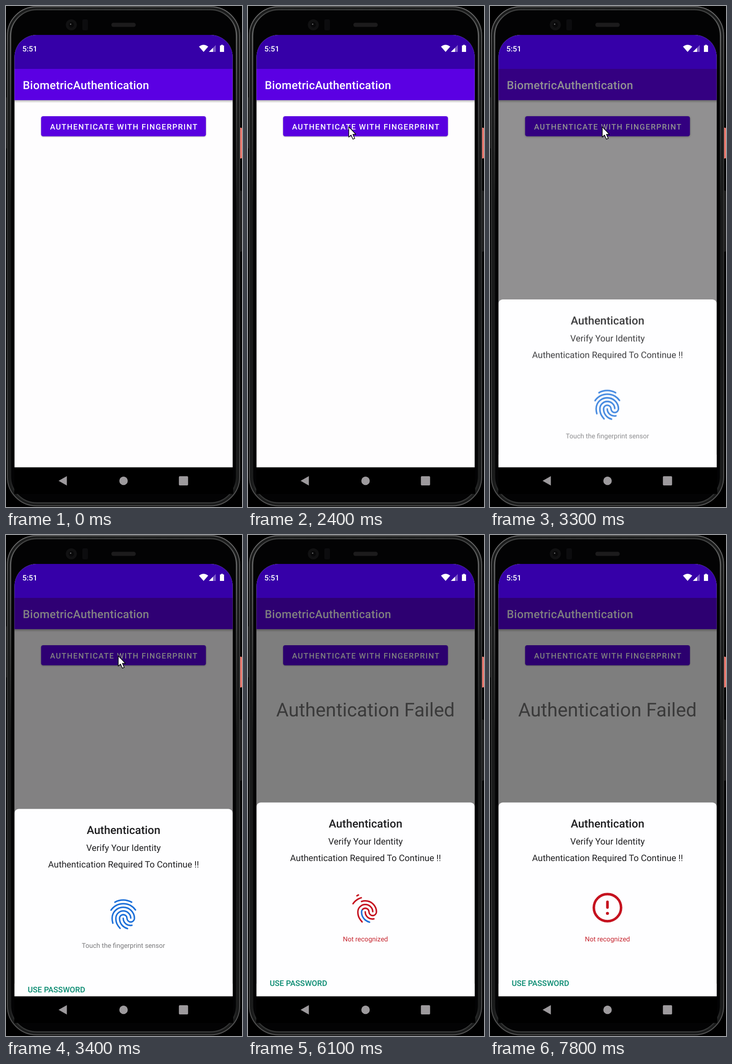
Write an HTML page that moves like this. It is 513 by 1091 pixels and loops after 8000 ms.

```html
<!DOCTYPE html>
<html lang="en">
<head>
<meta charset="utf-8">
<title>Biometric prompt</title>
<style>
  html, body { margin: 0; width: 100%; height: 100%; overflow: hidden; background: #000; }
  svg { display: block; font-family: Roboto, sans-serif; text-rendering: geometricPrecision; }
  .med { font-weight: 500; }
  .mid { text-anchor: middle; }
  .line { fill: none; stroke-linecap: round; stroke-linejoin: round; }
</style>
</head>
<body>
<svg width="513" height="1091" viewBox="0 0 513 1091">
  <defs>
    <linearGradient id="edge" x1="0" y1="0" x2="0" y2="1">
      <stop offset="0" stop-color="#6a6a6a"/>
      <stop offset=".08" stop-color="#555"/>
      <stop offset=".25" stop-color="#383939"/>
      <stop offset=".6" stop-color="#2b2c2c"/>
      <stop offset="1" stop-color="#555"/>
    </linearGradient>
    <linearGradient id="gloss" x1="0" y1="0" x2="0" y2="1">
      <stop offset="0" stop-color="#3c3d3d"/>
      <stop offset=".05" stop-color="#6c6d6d"/>
      <stop offset=".2" stop-color="#454646"/>
      <stop offset=".4" stop-color="#151616"/>
      <stop offset=".95" stop-color="#1c1d1d"/>
      <stop offset="1" stop-color="#3a3b3b"/>
    </linearGradient>
    <linearGradient id="shade" x1="0" y1="0" x2="0" y2="1">
      <stop offset="0" stop-opacity=".28"/>
      <stop offset="1" stop-opacity="0"/>
    </linearGradient>
    <clipPath id="screen">
      <path d="M18.500 1006V111A48 48 0 0 1 66.500 63H444.700A48 48 0 0 1 492.700 111V1006Z"/>
    </clipPath>
  </defs>

  <!-- phone body -->
  <rect width="513" height="1091"/>
  <rect x="505" y="265" width="8" height="67" rx="2" fill="#ec7b70"/>
  <rect x="505" y="402" width="8" height="133" rx="2" fill="#1c1c1c"/>
  <path d="M0 199H3V310H0Z" fill="#161616"/>
  <rect x="3" y="1.500" width="505" height="1087" rx="63" fill="#1a1b1b" stroke="url(#edge)" stroke-width="2"/>
  <rect x="10" y="8" width="491" height="1074" rx="57" fill="#030304" stroke="url(#gloss)" stroke-width="2.500"/>
  <circle cx="142" cy="41" r="12" fill="#111112"/>
  <circle cx="142" cy="41" r="6" fill="#09090a"/>
  <circle cx="140.500" cy="39.500" r="1.500" fill="#666"/>
  <rect x="166" y="29" width="12" height="24" rx="3" fill="#0c0c0e"/>
  <rect x="229" y="36.500" width="53" height="9" rx="4.500" fill="#1c1b1c"/>

  <g clip-path="url(#screen)">
    <rect x="18" y="63" width="476" height="943" fill="#fefdfe"/>
    <rect x="18" y="205" width="476" height="6" fill="url(#shade)"/>
    <rect x="18" y="137" width="476" height="68" fill="#5b00e3"/>
    <text class="med" x="36.500" y="181" font-size="24.600" letter-spacing=".3" fill="#fff">BiometricAuthentication</text>
    <rect id="button" x="76.300" y="240" width="358.300" height="43.800" rx="4.500" fill="#5900e0"/>
    <text class="med" x="95.700" y="269" font-size="16.900" letter-spacing="1.510" fill="#fff">AUTHENTICATE WITH FINGERPRINT</text>
    <text id="failed" class="mid" x="255.300" y="395" font-size="41.300" fill="#757575">Authentication Failed</text>
    <rect id="dim" x="18" y="137" width="476" height="840"/>

    <g id="sheet">
      <rect x="18.500" y="582.500" width="474.200" height="480" rx="9" fill="#fefeff"/>
      <g id="content" fill="#1f1f21">
        <text class="mid med" x="255.500" y="637" font-size="24.400">Authentication</text>
        <text class="mid" x="255.500" y="674" font-size="19.350">Verify Your Identity</text>
        <text class="mid" x="255.500" y="710" font-size="19.300">Authentication Required To Continue !!</text>
        <g id="finger" class="line" transform="translate(255 812) scale(3.14 3.28) translate(-12 -12)"></g>
        <g id="error" fill="#c5121f">
          <circle id="ring" class="line" cx="255.300" cy="811.500" r="29.600" pathLength="1" stroke="#c5121f" stroke-width="5.500" transform="rotate(-90 255.300 811.500)"/>
          <g id="mark">
            <rect x="-2.900" y="-15.500" width="5.800" height="18" rx="2.900"/>
            <circle cy="12.500" r="3.300"/>
          </g>
        </g>
        <text id="hint" class="mid" x="255.300" y="885" font-size="14.500"></text>
        <text class="med" x="47.200" y="982" font-size="17" fill="#078a70">USE PASSWORD</text>
      </g>
    </g>

    <!-- status bar -->
    <rect x="18" y="63" width="476" height="74" fill="#3600a8"/>
    <g fill="#fff">
      <text class="med" x="35.500" y="99" font-size="16.500">5:51</text>
      <path d="M419.500 88.500Q429.500 80.500 439.500 88.500L429.500 100Z"/>
      <path d="M441 100L456 85V100Z" opacity=".35"/>
      <path d="M441 100L450 91V100Z"/>
      <path d="M467.500 84.500H471.500V86H474V100H465V86H467.500Z"/>
    </g>
  </g>

  <!-- navigation bar -->
  <rect x="18" y="1004.600" width="476" height="58"/>
  <g fill="#9d9a9d">
    <path d="M114.300 1034L132.300 1023.700V1044.300Z"/>
    <circle cx="255.500" cy="1034" r="9.200"/>
    <rect x="375.800" y="1024" width="20" height="20" rx="2"/>
  </g>

  <path id="cursor" d="M0 0V22.500L5 18L9 27L13 25.300L9 16.500H15.500Z" fill="#fff" stroke="#000" stroke-width="1.400" stroke-linejoin="round"/>
</svg>
<script>
const LOOP = 8000, STEP = 100, FAIL = 5900;
const BLUE = '#1d70d9', RED = '#c5121f';
const $ = id => document.getElementById(id);
const show = (el, on) => el.setAttribute('visibility', on ? 'inherit' : 'hidden');

// Piecewise linear value from [time, value] pairs.
function tween(t, keys) {
  if (t <= keys[0][0]) return keys[0][1];
  for (let i = 1; i < keys.length; i++) {
    const [a, from] = keys[i - 1], [b, to] = keys[i];
    if (t <= b) return from + (to - from) * (t - a) / (b - a);
  }
  return keys[keys.length - 1][1];
}

// Each ridge: path, then the trimmed end and the red start 100, 200 and 300 ms after the failure.
const ridges = [
  ['M6.2 3.97C7.82 3 9.9 2.500 12 2.500S15.8 2.95 17.8 3.97', [.6, .1, 0], [.3, 0, 0]],
  ['M3.5 9.22C4.4 7.9 5.6 6.85 7.05 6.1C10.1 4.55 13.95 4.55 17 6.1C18.4 6.85 19.6 7.9 20.5 9.2', [.75, .36, 0], [.4, 0, 0]],
  ['M14.9 21.5C13.4 21.1 12.4 20.55 11.4 19.55C10.1 18.25 9.39 16.5 9.39 14.66C9.39 13.32 10.55 12.22 11.97 12.22S14.55 13.32 14.55 14.66S15.7 17.1 17.13 17.1S19.71 16 19.71 14.66C19.71 10.6 16.25 7.33 11.96 7.33C8.9 7.33 6.13 9.02 4.9 11.65C4.47 12.5 4.26 13.5 4.26 14.66C4.26 15.5 4.33 16.8 4.95 18.45', [.92, .76, .4], [.65, .22, 0]],
  ['M9.75 21.29C8.95 20.45 8.45 19.85 7.8 18.7C7.18 17.6 6.84 16.16 6.84 14.66C6.84 11.95 9.15 9.77 12 9.77S17.16 11.95 17.16 14.66', [1, 1, .5], [.5, 0, 0]],
  ['M11.94 14.66C11.94 16.2 12.75 17.65 14.1 18.57C14.9 19.1 15.85 19.4 16.92 19.4C17.2 19.4 17.6 19.37 18.05 19.29', [1, 1, .5], [.6, 0, 0]]
].map(([d, end, red]) => {
  const stroke = color => {
    const p = document.createElementNS('http://www.w3.org/2000/svg', 'path');
    const attrs = { d, stroke: color, pathLength: 1, 'stroke-width': 1.02 };
    for (const k in attrs) p.setAttribute(k, attrs[k]);
    return $('finger').appendChild(p);
  };
  const keys = list => [1, ...list, 0].map((v, i) => [FAIL + i * 100, v]);
  return { blue: stroke(BLUE), red: stroke(RED), end: keys(end), start: keys(red) };
});

function trim(path, from, to) {
  show(path, to > from);
  path.setAttribute('stroke-dasharray', `${to - from} 9`);
  path.setAttribute('stroke-dashoffset', -from);
}

const cursorX = [[1200, 470], [1300, 440], [1400, 440], [1700, 380], [2000, 270], [2300, 222], [2400, 219], [2700, 240], [2900, 244], [3500, 244], [3800, 360], [4100, 520]];
const cursorY = [[1200, 760], [1400, 774], [1700, 620], [2000, 370], [2300, 268], [2400, 263], [3500, 263], [4100, 250]];

function draw(t) {
  show($('cursor'), t >= 1200 && t < 4100);
  $('cursor').setAttribute('transform', `translate(${tween(t, cursorX)} ${tween(t, cursorY)})`);

  const lift = tween(t, [[2900, 0], [3100, 1], [3200, 1], [3300, .3], [3500, 0]]);
  $('button').style.filter = `drop-shadow(0 ${1 + 2 * lift}px ${1 + 3 * lift}px rgba(0,0,0,.33))`;

  $('dim').setAttribute('opacity', tween(t, [[3100, 0], [3200, .034], [3300, .43], [3400, .49], [3500, .5]]));
  show($('sheet'), t >= 3300);
  $('sheet').setAttribute('transform', `translate(0 ${tween(t, [[3300, 56.5], [3400, 14], [3500, 0]])})`);
  $('content').setAttribute('opacity', tween(t, [[3300, .87], [3400, 1]]));

  const bad = t >= FAIL;
  show($('failed'), bad);
  $('hint').textContent = bad ? 'Not recognized' : 'Touch the fingerprint sensor';
  $('hint').setAttribute('fill', bad ? '#c62630' : '#7a7a7c');

  for (const r of ridges) {
    const end = tween(t, r.end), start = Math.min(end, tween(t, r.start));
    trim(r.blue, 0, start);
    trim(r.red, start, end);
  }
  trim($('ring'), 0, tween(t, [[6100, 0], [6200, .35], [6400, 1]]));
  const pop = tween(t, [[6200, 0], [6400, 1.1], [6500, 1]]);
  show($('mark'), pop > 0);
  $('mark').setAttribute('transform', `translate(255.3 811.5) scale(${pop})`);
}

const begin = performance.now();
function tick() {
  const t = (performance.now() - begin) % LOOP;
  draw(Math.floor(t / STEP) * STEP);
  requestAnimationFrame(tick);
}
tick();
</script>
</body>
</html>
```
